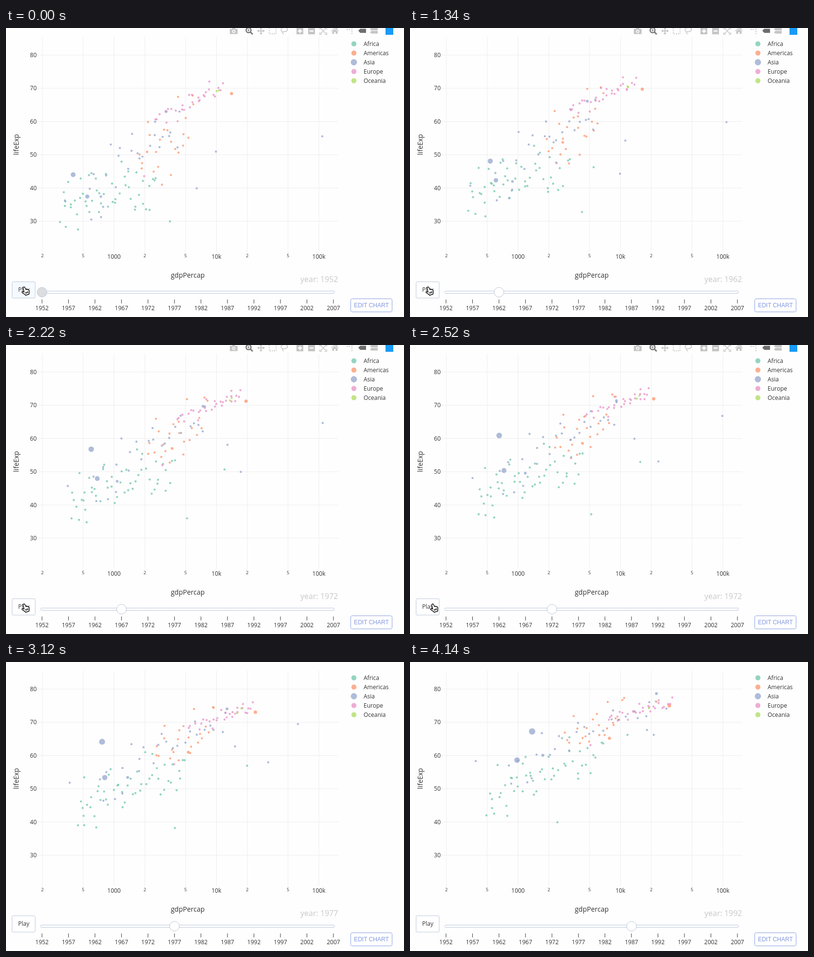
An HTML page that plays this animation: 818 px wide and 595 px high, repeating every 4.24 s.

```html
<!DOCTYPE html>
<html lang="en">
<head>
<meta charset="utf-8">
<title>Life expectancy by income</title>
<style>
  html, body { margin: 0; width: 100%; height: 100%; overflow: hidden; background: #fefefe; }
  svg { display: block; width: 818px; height: 595px; font: 12px "Open Sans", sans-serif; fill: #333; }
  .mid { text-anchor: middle; }
  .end { text-anchor: end; }
  .minor { font-size: 9px; text-anchor: middle; }
  .title { font-size: 14px; text-anchor: middle; }
  #dots circle { opacity: .7; }
  #bar .line { fill: none; stroke: currentColor; stroke-width: 1.8; }
</style>
</head>
<body>
<svg viewBox="0 0 818 595">
  <g id="grid"></g>
  <g id="dots"></g>
  <text class="title" x="373.5" y="514">gdpPercap</text>
  <text class="title" transform="translate(26 240) rotate(-90)">lifeExp</text>
  <g id="legend"></g>

  <g id="bar" fill="#c5c5c5" color="#c5c5c5">
    <path fill-rule="evenodd" d="M460 2h4l1.500-2h5l1.500 2h4v10.500h-16zM468 3.500a3.500 3.500 0 1 0 .01 0zM468 5.200a1.800 1.800 0 1 1-.01 0z"/>
    <g color="#7a7a7a">
      <circle class="line" cx="498.500" cy="4.500" r="5" style="stroke-width:2.600"/>
      <path class="line" d="M502 8l5 5" style="stroke-width:3"/>
      <path class="line" d="M496 4.500h5M498.500 2v5" style="stroke-width:1.200"/>
    </g>
    <path class="line" d="M518 6h12M524 0v12"/>
    <path d="M516 6l4-3v6zM532 6l-4-3v6zM524 14l-3-4h6zM521 1.500h6l-2-2h-2z"/>
    <path class="line" d="M541 0V12H555V0" stroke-dasharray="2 2.400"/>
    <path class="line" d="M568 8C562 3 567-1 573-1S581 5 575 7 568 6 568 9s3 2 2 4" style="stroke-width:1.500"/>
    <path fill-rule="evenodd" d="M597-1h14v14h-14zM603 2v3h-3v2.500h3v3h2.500v-3h3V5h-3V2zM621-1h14v14h-14zM624 5v2.500h8V5z"/>
    <path class="line" d="M645 3V0h4M655 0h4v3M645 9v4h4M655 13h4V9M647 1l10 10M657 1L647 11" style="stroke-width:1.500"/>
    <path d="M668 6l8-7 3 2.700V0h2v3.500l3 2.500-1 1-7-6-7 6zM670.500 7l5.500-4.500L681.500 7v5h-4V8h-3v4h-4z"/>
    <path class="line" d="M700 3h9M711 1v12" stroke-dasharray="2.500 2"/>
    <path fill="#6e6e6e" d="M724 5.500l4-4h12v8.500h-12z"/>
    <path d="M748 2.500l3-3h13V5h-13zM748 9l3-3h13v5.500h-13z"/>
    <rect x="780" y="-2" width="16" height="16" fill="#199af6"/>
  </g>

  <text id="year" class="end" x="682.500" y="523" font-size="16" fill="#c8c8c8"></text>
  <rect id="play" x="12.500" y="522.500" width="47.500" height="33.500" rx="2" stroke="#bec8d9"/>
  <text class="mid" x="36.500" y="542.500">Play</text>
  <rect x="71.500" y="541.500" width="603.500" height="5" rx="2" fill="#fbfcfe" stroke="#bec8d9"/>
  <g id="years"></g>
  <circle id="grip" cy="544" r="10" stroke="#bec8d9"/>
  <rect x="708.500" y="557.500" width="85" height="27" rx="3" fill="#fff" stroke="#8b9fe2"/>
  <text class="mid" x="751" y="575" fill="#8095df" style="font-family:'Liberation Sans',sans-serif">EDIT CHART</text>
  <path id="hand" fill="#fff" stroke="#111" stroke-width="1.500" stroke-linejoin="round"
    d="M4 1.500c1-.8 2.300-.3 2.800.8l2 4.200c.6-1 2-.9 2.500.1.900-.7 2-.3 2.300.6 1-.4 1.800.2 2 1.200.5 2.600.2 4.500-.3 7.600l-7 2.200c-1.500-2-4.600-3.600-7-5.200-1.200-1-.2-2.600 1.400-2.200l2.400.9L3.400 4c-.4-1-.2-2 .6-2.500zM8 12l1.300 3M10.300 11l1.200 3.200M12.500 10.200l1 3"/>
</svg>
<script>
const LOOP = 4240, LAST = 7, SMALL = 2.2;
const $ = id => document.getElementById(id);
const mix = (a, b, p) => a + (b - a) * p;
const ease = t => t < .5 ? 4 * t ** 3 : 1 - 4 * (1 - t) ** 3;

function add(parent, tag, attrs, text = '') {
  const el = document.createElementNS('http://www.w3.org/2000/svg', tag);
  for (const key in attrs) el.setAttribute(key, attrs[key]);
  el.textContent = text;
  return parent.appendChild(el);
}

// Axes
const gdpX = g => 222 + 210.5 * Math.log10(g / 1000);
const lifeY = l => 55.8 + (80 - l) * 6.838;
const gridLine = d => add($('grid'), 'path', { d, stroke: '#ededed' });
for (let decade = 100; decade <= 1e5; decade *= 10) {
  for (const lead of [1, 2, 5]) {
    const g = decade * lead, x = gdpX(g), major = lead === 1;
    if (g < 200 || g > 1e5) continue;
    gridLine(`M${x} 18V461`);
    add($('grid'), 'text', { x, y: major ? 475 : 472, class: major ? 'mid' : 'minor' },
      !major ? lead : g > 1000 ? g / 1000 + 'k' : g);
  }
}
for (let l = 30; l <= 80; l += 10) {
  gridLine(`M66 ${lifeY(l)}H683`);
  add($('grid'), 'text', { x: 63, y: lifeY(l) + 4.3, class: 'end' }, l);
}

// Slider scale
const stopX = i => 74 + 54.45 * i;
for (let i = 0; i < 12; i++) {
  add($('years'), 'path', { d: `M${stopX(i)} 559v8`, stroke: '#333' });
  add($('years'), 'text', { x: stopX(i), y: 581, class: 'mid' }, 1952 + 5 * i);
}

let seed = 1952;
function rand() {
  seed = (seed + 0x6D2B79F5) | 0;
  let z = Math.imul(seed ^ seed >>> 15, 1 | seed);
  z = z + Math.imul(z ^ z >>> 7, 61 | z) ^ z;
  return ((z ^ z >>> 14) >>> 0) / 4294967296;
}
const scatter = () => rand() + rand() - 1;

const dots = [];
function addDot(color, at, r0 = SMALL, r1 = r0) {
  dots.push({ el: add($('dots'), 'circle', { fill: color }), at, r0, r1 });
}

// Moves through points that are evenly spaced in time
const track = points => s => {
  const pos = s / LAST * (points.length - 1);
  const i = Math.min(points.length - 2, Math.floor(pos));
  return points[i].map((v, axis) => mix(v, points[i + 1][axis], pos - i));
};

// Drifts with a cloud whose trend line goes from `first` to `last`
function drift(g, i) {
  const u = ((i + rand()) / g.n) ** g.skew;
  const a = scatter(), b = .75 * a + .4 * scatter(), turn = rand() * 6.28;
  const [x0, y0, x1, y1] = [g.first, g.last].flatMap(([xa, ya, xb, yb, spread], end) =>
    [mix(xa, xb, u), mix(ya, yb, u) + spread * (end ? b : a)]);
  return s => [mix(x0, x1, s / LAST) + 3 * Math.sin(turn + s), mix(y0, y1, (s / LAST) ** .8)];
}

// first, last: trend line x, y, x, y and vertical spread; stars: points, then first and final radius
const groups = [
  { name: 'Africa', color: '#66c2a5', n: 50, skew: 1.15,
    first: [113, 364, 310, 312, 70], last: [160, 282, 398, 166, 72],
    stars: [[[[302, 311], [428, 270], [502, 222], [447, 150]]],
      [[[337, 398], [378, 350], [303, 330]]]] },
  { name: 'Americas', color: '#fc8d62', n: 23, skew: 1,
    first: [270, 285, 390, 190, 85], last: [315, 168, 445, 103, 52],
    stars: [[[[463.5, 135], [533, 90]], 3.2, 3.7], [[[290, 255], [410, 157]], 2.5, 3.2]] },
  { name: 'Asia', color: '#8da0cb', n: 25, skew: 1,
    first: [165, 342, 360, 185, 75], last: [195, 225, 500, 85, 50],
    stars: [[[[138, 302], [165, 274], [173, 222], [188, 170], [206, 159], [251, 143]], 5, 6.5],
      [[[167, 347], [191, 263], [220, 202]], 4.3, 5.8],
      [[[650, 223], [651, 150], [527, 96]]],
      [[[392, 330], [458, 280], [544, 214], [501, 150]]],
      [[[329, 172], [506.5, 65]], 2.9],
      [[[195, 347], [273, 192]], 2.6, 3.1],
      [[[121, 355], [135, 204]]],
      [[[431.5, 254.5], [487, 140]]]] },
  { name: 'Europe', color: '#e78ac3', n: 29, skew: .8,
    first: [300, 200, 445, 112, 26], last: [400, 121, 537, 77, 21],
    stars: [[[[284, 305], [371, 171]]]] },
  { name: 'Oceania', color: '#a6d854', n: 0,
    stars: [[[[433, 130], [505, 81]]], [[[437.5, 128.5], [491, 95]]]] }
];

groups.forEach((g, row) => {
  for (let i = 0; i < g.n; i++) addDot(g.color, drift(g, i));
  for (const [points, ...radii] of g.stars) addDot(g.color, track(points), ...radii);

  const y = 32.5 + 19 * row;
  add($('legend'), 'circle', { cx: 715, cy: y, r: g.name === 'Asia' ? 6.4 : 5.2, fill: g.color, opacity: .7 });
  add($('legend'), 'text', { x: 735, y: y + 4.5 }, g.name);
});

// Start of each five-year move, in steps
const starts = [-1.35, 2.44, 6.17, 9.95, 13.46, 16.7, 19.8, 22.9];
const MOVE = 3.37;

function draw(t) {
  const step = Math.floor((t - 738) / 147.8);
  let year = 0, state = 0, grip = 0;
  if (step >= 0) {
    year = starts.filter(k => k <= step).length;
    const since = step - starts[year - 1];
    state = Math.min(LAST, year - 1 + ease(Math.min(1, since / MOVE)));
    grip = year - 1 + ease(Math.min(1, since));
  }

  for (const { el, at, r0, r1 } of dots) {
    const [x, y] = at(state);
    el.setAttribute('cx', x.toFixed(2));
    el.setAttribute('cy', y.toFixed(2));
    el.setAttribute('r', mix(r0, r1, state / LAST).toFixed(2));
  }

  const pressed = t < 140;
  $('year').textContent = 'year: ' + (1952 + 5 * year);
  $('grip').setAttribute('cx', stopX(grip));
  $('grip').setAttribute('fill', pressed ? '#dbdde0' : '#fff');
  $('play').setAttribute('fill', pressed ? '#f4faff' : '#fff');
  $('hand').setAttribute('transform', `translate(${step < 11 ? 32 : step < 12 ? 36 : 41.5} 532)`);
  $('hand').style.opacity = step < 13 ? 1 : 0;
  $('bar').style.opacity = step < 14 ? 1 : step < 15 ? .5 : 0;
}

function tick() {
  draw(performance.now() % LOOP);
  requestAnimationFrame(tick);
}
tick();
</script>
</body>
</html>
```
